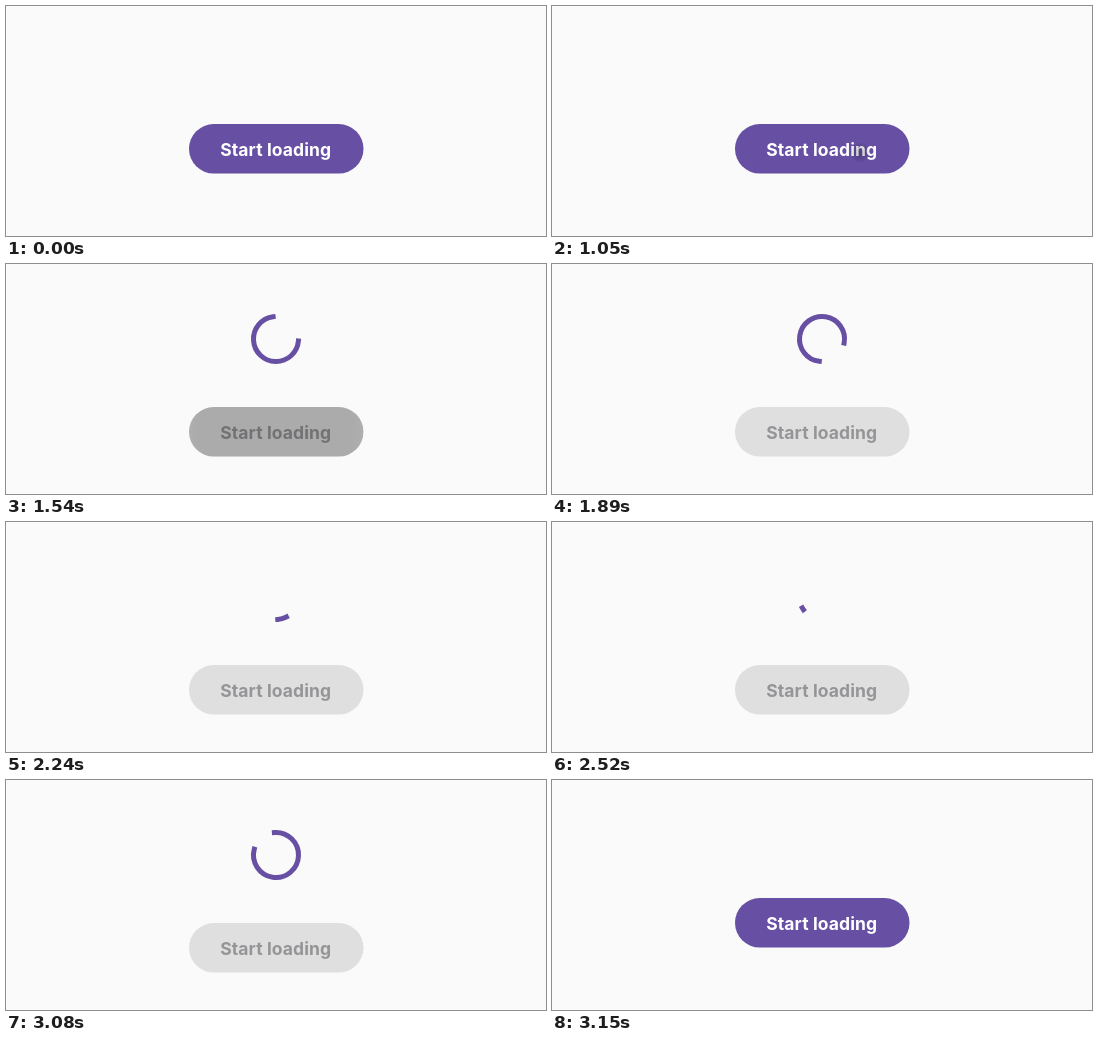
An HTML page that plays this animation: 540x230 px, repeating every 3780 ms.

```html
<!DOCTYPE html>
<html lang="en">
<head>
<meta charset="utf-8">
<title>Loading button</title>
<style>
  html, body { margin: 0; width: 100%; height: 100%; overflow: hidden; background: #fafafa; }
  svg { display: block; width: 540px; height: 230px; }
  text { font: 700 17.5px Inter, sans-serif; letter-spacing: .1px; text-anchor: middle; }
</style>
</head>
<body>
<svg viewBox="0 0 540 230">
  <defs>
    <clipPath id="pill"><rect x="183" y="118" width="174.5" height="49.6" rx="24.8"/></clipPath>
    <radialGradient id="ink" gradientUnits="userSpaceOnUse">
      <stop offset=".33"/>
      <stop offset="1" stop-opacity="0"/>
    </radialGradient>
  </defs>
  <path id="spinner" fill="none" stroke="#6750a4" stroke-width="5" stroke-linecap="square"/>
  <g id="button">
    <rect id="face" x="183" y="118" width="174.5" height="49.6" rx="24.8"/>
    <text id="label" x="269.7" y="150">Start loading</text>
    <rect id="ripple" x="183" y="118" width="174.5" height="50" fill="url(#ink)" clip-path="url(#pill)"/>
  </g>
</svg>
<script>
const LOOP = 3780, STEP = 70;
const PRESS = 1050, LOAD_START = 1130, LOAD_END = 3150;
const RIPPLE_GROW = 440, FADE_START = 1495, FADE_TIME = 375;
const CYCLE = 1332, BASE_TURN = 286, JUMP = 290;

const el = id => document.getElementById(id);
const set = (id, attrs) => {
  for (const name in attrs) el(id).setAttribute(name, attrs[name]);
};
const clamp = x => Math.min(1, Math.max(0, x));
const mix = (a, b, p) => a + (b - a) * p;

// cubic-bezier(.4, 0, .2, 1)
function ease(x) {
  if (x <= 0 || x >= 1) return clamp(x);
  let lo = 0, hi = 1;
  for (let i = 0; i < 24; i++) {
    const s = (lo + hi) / 2, r = 1 - s;
    if (1.2 * s * r * r + .6 * s * s * r + s ** 3 < x) lo = s; else hi = s;
  }
  return lo * lo * (3 - 2 * lo);
}

// Clockwise arc, degrees from 12 o'clock
function arcPath(start, sweep) {
  const point = deg => {
    const a = deg * Math.PI / 180;
    return `${(270 + 22.5 * Math.sin(a)).toFixed(3)} ${(75 - 22.5 * Math.cos(a)).toFixed(3)}`;
  };
  return `M${point(start)}A22.5 22.5 0 ${sweep > 180 ? 1 : 0} 1 ${point(start + sweep)}`;
}

function drawSpinner(time) {
  const turn = Math.floor(time / CYCLE), p = time / CYCLE - turn;
  const head = JUMP * ease(p * 2), tail = JUMP * ease(p * 2 - 1);
  const offset = turn * (BASE_TURN + JUMP) + BASE_TURN * p;
  const capOffset = 7.16;
  set('spinner', { d: arcPath(offset + tail + capOffset, Math.max(head - tail, .1)) });
}

function drawRipple(time) {
  const grown = 1 - (1 - clamp((time - PRESS) / RIPPLE_GROW)) ** 5;
  const fade = 1 - clamp((time - FADE_START) / FADE_TIME);
  const alpha = time < PRESS ? 0 : mix(.19, .267, clamp((time - PRESS) / 75)) * fade;
  set('ink', { cx: mix(308, 270, grown), cy: mix(146.5, 143, grown), r: mix(11, 230, grown) });
  set('ripple', { opacity: alpha });
}

function render(time) {
  const loading = time >= LOAD_START && time < LOAD_END;
  set('spinner', { visibility: loading ? 'visible' : 'hidden' });
  if (loading) drawSpinner(time - LOAD_START);
  set('button', { transform: `translate(0 ${loading ? 25 : 0})` });
  set('face', { fill: loading ? '#dfdfe0' : '#6750a4' });
  set('label', { fill: loading ? '#1c1b1f' : '#fff', 'fill-opacity': loading ? .38 : 1 });
  drawRipple(time);
}

const began = performance.now();
function tick() {
  const time = (performance.now() - began) % LOOP;
  render(Math.floor(time / STEP) * STEP);
  requestAnimationFrame(tick);
}
tick();
</script>
</body>
</html>
```
